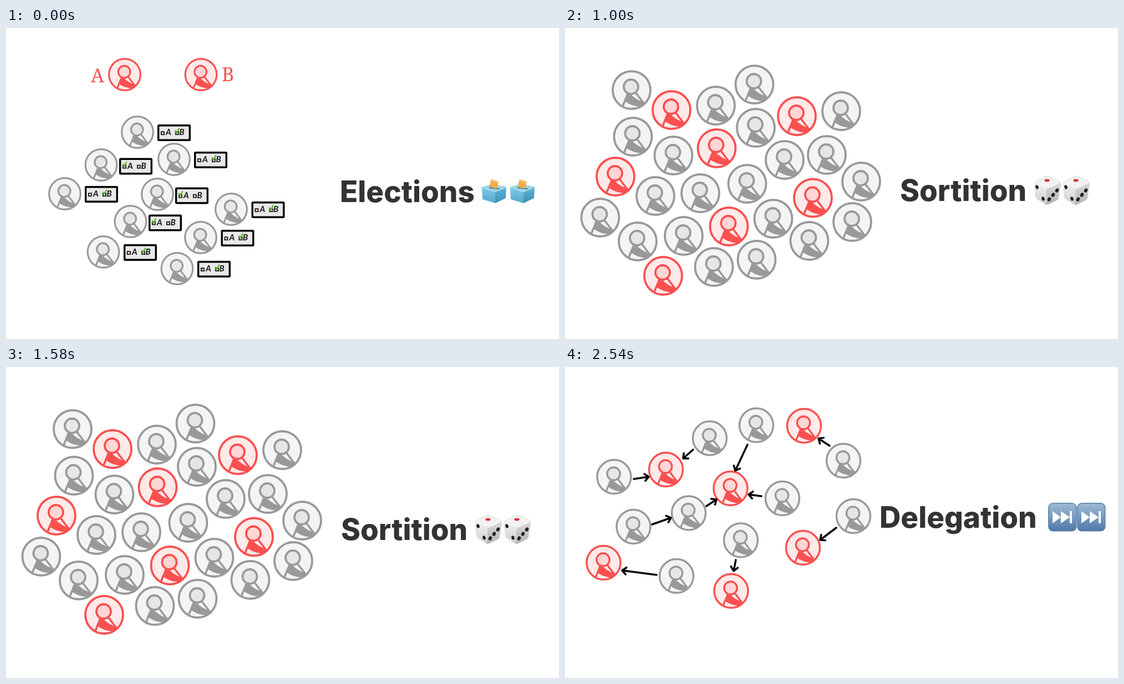
Recreate the animation shown at these times as an HTML page. Size 997x561 px, loop 2920 ms.

```html
<!DOCTYPE html>
<html lang="en">
<head>
<meta charset="utf-8">
<title>Ways to choose representatives</title>
<style>
  html, body { margin: 0; width: 100%; height: 100%; overflow: hidden; background: #fff; }
  svg { display: block; width: 100%; height: 100%; }
  .scene { visibility: hidden; animation: 2920ms step-end infinite; }
  #elections { animation-name: first; }
  #sortition { animation-name: second; }
  #delegation { animation-name: third; }
  @keyframes first { 0% { visibility: visible; } 34.2466%, 100% { visibility: hidden; } }
  @keyframes second { 0% { visibility: hidden; } 34.2466% { visibility: visible; } 67.1233%, 100% { visibility: hidden; } }
  @keyframes third { 0% { visibility: hidden; } 67.1233%, 100% { visibility: visible; } }
  .title { font: 800 53px Poppins, Inter, sans-serif; fill: #333; }
  .candidate { font: 300 34px "Noto Serif", serif; fill: #fa5050; }
  .choice { font: italic 700 15px Lato, sans-serif; fill: #111; }
  .gray { --line: #999; --fill: #f4f4f4; --head: #e6e6e6; }
  .red { --line: #fa5050; --fill: #ffe9e9; --head: #ffd6d6; }
  .disc { fill: var(--fill); stroke: var(--line); stroke-width: 3.8; }
  .face { fill: var(--head); stroke: var(--line); stroke-width: 3.8; }
  .limb { fill: none; stroke: var(--line); stroke-width: 3.6; }
  .sash { fill: var(--line); }
  .arrow { fill: none; stroke: #000; stroke-width: 3.5; stroke-linecap: round; stroke-linejoin: round; }
</style>
</head>
<body>
<svg viewBox="0 0 997 561" preserveAspectRatio="none">
  <defs>
    <linearGradient id="key" x2="0" y2="1">
      <stop offset="0" stop-color="#9dbad6"/><stop offset="1" stop-color="#4f7aa6"/>
    </linearGradient>
    <linearGradient id="boxLeft" x2="0" y2="1">
      <stop offset="0" stop-color="#7cc6e2"/><stop offset="1" stop-color="#57a9cc"/>
    </linearGradient>
    <linearGradient id="boxRight" x2="0" y2="1">
      <stop offset="0" stop-color="#5fb2d3"/><stop offset="1" stop-color="#3f8fb7"/>
    </linearGradient>
    <linearGradient id="dieLeft" x2="0" y2="1">
      <stop offset="0" stop-color="#f0f0f0"/><stop offset="1" stop-color="#cfcfcf"/>
    </linearGradient>
    <linearGradient id="dieRight" x2="0" y2="1">
      <stop offset="0" stop-color="#dadada"/><stop offset="1" stop-color="#b4b4b4"/>
    </linearGradient>

    <g id="person">
      <circle class="disc" r="34"/>
      <path class="limb" d="M-7 7L-16 29M7 4L23 25"/>
      <path class="sash" d="M-8 7L-13 19C-7 25 4 29 16 30L25 23C15 20 6 15 0 9Z"/>
      <circle class="face" cx="-1" cy="-6" r="13"/>
    </g>

    <g id="blank">
      <rect x=".9" y="1.2" width="5" height="5" fill="#fff" stroke="#111" stroke-width="1.8"/>
    </g>
    <g id="tick">
      <rect x=".9" y="1" width="5.2" height="5.2" fill="#eee" stroke="#222" stroke-width="1.8"/>
      <path d="M.5 -1.5L3 3L7.5 -5.5" fill="none" stroke="#62b52d" stroke-width="2.4"/>
    </g>

    <g id="ballotBox" stroke-linejoin="round">
      <path d="M2 16L26 23V43L3 36Z" fill="url(#boxLeft)"/>
      <path d="M26 23L46 15L45 34L26 43Z" fill="url(#boxRight)"/>
      <path d="M1 15L21 9L46 14L26 22Z" fill="#9bd8ec" stroke="#83c9e2"/>
      <path d="M15 15L33 17" stroke="#32718f" stroke-width="2"/>
      <path d="M19 0L32 4L29 17L15 14Z" fill="#f3ab4b"/>
      <path d="M19 0L32 4L31 8L18 3Z" fill="#f8bd67"/>
    </g>

    <g id="die">
      <path d="M1 15Q1 11 6 9L21 1Q25 -1 30 1L45 8Q50 11 50 15L46 38Q46 42 42 44L28 51Q24 53 20 50L8 42Q4 40 4 36Z" fill="#d4d4d4"/>
      <path d="M1 15Q0 11 4 13L21 21Q25 23 24 28L23 52L8 42Q4 40 4 36Z" fill="url(#dieLeft)"/>
      <path d="M25 27Q25 23 29 21L46 12Q50 11 50 15L46 38Q46 42 42 44L28 51L23 52Z" fill="url(#dieRight)"/>
      <path d="M4 11L21 2Q25 0 30 2L47 10Q49 12 46 14L29 22Q25 24 20 21L4 14Q2 12 4 11Z" fill="#f3f3f3"/>
      <ellipse cx="25" cy="8" rx="4.7" ry="2.4" fill="#d8333c"/>
      <g fill="#222">
        <ellipse cx="7" cy="20" rx="2.7" ry="3.7" transform="rotate(-18 7 20)"/>
        <ellipse cx="18" cy="41" rx="2.7" ry="3.7" transform="rotate(-18 18 41)"/>
        <ellipse cx="43" cy="26" rx="3" ry="3.9" transform="rotate(25 43 26)"/>
        <ellipse cx="36" cy="34" rx="3" ry="3.9" transform="rotate(25 36 34)"/>
        <ellipse cx="29" cy="42" rx="3" ry="3.9" transform="rotate(25 29 42)"/>
      </g>
    </g>

    <g id="skip">
      <rect x=".8" y=".8" width="50" height="50" rx="8" fill="url(#key)" stroke="#557d a5" style="stroke:#557da5" stroke-width="1.4"/>
      <path d="M8 15L23 26L8 37ZM23 15L39 26L23 37ZM39 15H43V37H39Z" fill="#fff"/>
    </g>
  </defs>

  <g class="scene" id="elections">
    <text class="candidate" x="153" y="98">A</text>
    <text class="candidate" x="389" y="96">B</text>
    <text class="title" x="602" y="314">Elections</text>
    <use href="#ballotBox" x="856" y="273"/>
    <use href="#ballotBox" x="907" y="273"/>
  </g>
  <g class="scene" id="sortition">
    <text class="title" x="604" y="312">Sortition</text>
    <use href="#die" x="844" y="267"/>
    <use href="#die" x="896" y="267"/>
  </g>
  <g class="scene" id="delegation">
    <text class="title" x="567" y="290">Delegation</text>
    <use href="#skip" x="871" y="245"/>
    <use href="#skip" x="923" y="245"/>
  </g>
</svg>
<script>
  const add = (id, markup) =>
    document.getElementById(id).insertAdjacentHTML("beforeend", markup);

  function people(id, color, radius, spots) {
    for (const [x, y] of spots) {
      add(id, `<use href="#person" class="${color}" transform="translate(${x} ${y}) scale(${radius / 36})"/>`);
    }
  }

  function ballot(x, y, vote) {
    const mark = name => vote === name ? "#tick" : "#blank";
    add("elections", `<g transform="translate(${x} ${y})">
      <rect x="1.7" y="1.7" width="56.6" height="26.6" rx="1" fill="#e8e8e8" stroke="#000" stroke-width="3.4"/>
      <use href="${mark("A")}" x="6" y="12"/><text class="choice" x="15" y="19">A</text>
      <use href="${mark("B")}" x="32" y="12"/><text class="choice" x="39.5" y="19">B</text></g>`);
  }

  function arrow(x1, y1, x2, y2) {
    const angle = Math.atan2(y2 - y1, x2 - x1);
    const barb = turn =>
      `${x2 - 9.5 * Math.cos(angle + turn)} ${y2 - 9.5 * Math.sin(angle + turn)}`;
    add("delegation", `<path class="arrow" d="M${x1} ${y1}L${x2} ${y2}M${barb(0.72)}L${x2} ${y2}L${barb(-0.72)}"/>`);
  }

  people("elections", "red", 30, [[214, 84], [351.5, 84]]);
  people("elections", "gray", 30, [
    [237, 188], [303, 237], [171.5, 247], [106, 299], [273, 300],
    [406, 327], [224.5, 349], [351, 378], [175.5, 404], [308.5, 434]
  ]);
  [
    [273, 174, "B"], [339, 223, "B"], [204, 234.5, "A"], [142, 285, "B"], [305, 287.5, "A"],
    [442.5, 313, "B"], [257, 336.5, "A"], [387.5, 364, "B"], [212, 390, "B"], [345, 420, "B"]
  ].forEach(args => ballot(...args));

  people("sortition", "gray", 36, [
    [120, 112], [272, 140], [341.5, 102], [498, 150], [344, 180], [122.5, 196], [195.5, 230],
    [396, 238], [472, 229], [534, 277], [163, 303], [244, 298], [328.5, 281], [63.5, 342],
    [131, 385], [214, 375], [375.5, 344], [518, 350], [440.5, 384], [268.5, 431], [345.5, 418]
  ]);
  people("sortition", "red", 36, [
    [192, 148], [418, 159], [273.5, 217], [91, 268], [447, 306.5], [295.5, 358], [177, 447]
  ]);

  people("delegation", "gray", 32.3, [
    [88.5, 198], [261, 128.5], [345, 105], [502, 169], [392, 237],
    [223, 263.5], [123.5, 288], [520, 269], [317, 312.5], [201, 377]
  ]);
  people("delegation", "red", 32.3, [
    [182, 185], [431, 106], [298.5, 219], [69.5, 353], [429, 326], [299.5, 404]
  ]);
  [
    [124, 202, 151, 198], [231, 149, 213, 165], [329, 140, 307, 187], [477, 142, 457, 129],
    [354, 233, 331, 230], [255, 251, 273, 239], [157, 284, 191, 272], [165, 375, 103, 367],
    [308, 348, 304, 368], [489, 290, 460, 312]
  ].forEach(args => arrow(...args));
</script>
</body>
</html>
```
